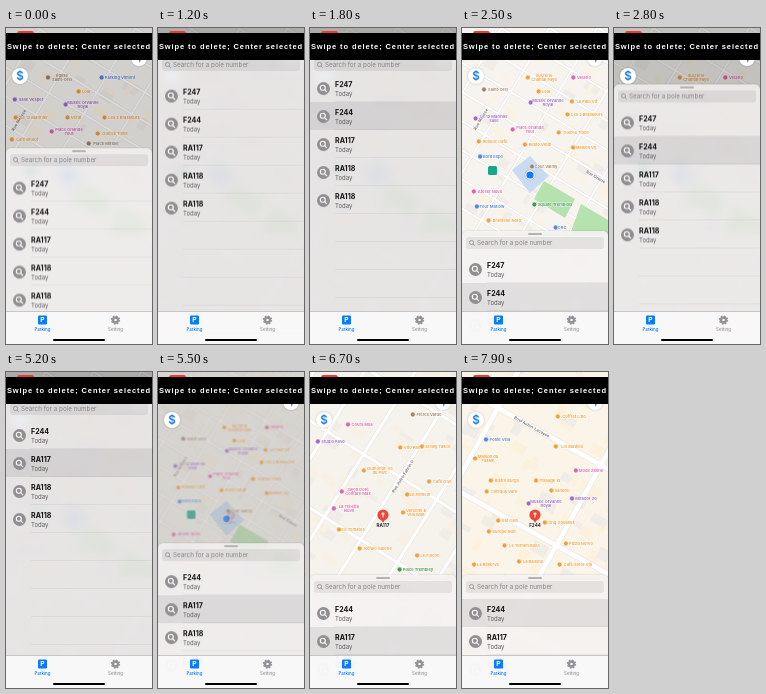
Write an HTML page that moves like this. It is 146 px wide and 316 px high and loops after 8 s.

```html
<!DOCTYPE html>
<html lang="en">
<head>
<meta charset="utf-8">
<title>Parking poles</title>
<style>
html, body { margin: 0; width: 100%; height: 100%; overflow: hidden; background: #f4f0e9; }
body { font-family: Inter, Roboto, sans-serif; }
#stage { position: relative; width: 146px; height: 316px; overflow: hidden; }
#stage div, #stage svg { position: absolute; box-sizing: border-box; }
#map { left: 0; top: 0; }
#map text { font-size: 4.1px; font-weight: 600; text-anchor: middle; stroke: #fff; stroke-width: .8px; stroke-opacity: .8; paint-order: stroke; }
#map .street { fill: #77716b; }
#map .pole { font-size: 4.6px; font-weight: 700; fill: #222; }
#map g { transform-origin: 73px 145px; }

#city, #city .old, #city .new, #north, #centre, #north .labels, #centre .labels,
#dim, #sheet, #list, .mark, .gone, .gone .row { animation: 8s linear infinite; }
#city { animation-name: city; }
#city .old { animation-name: old; }
#city .new { animation-name: new; }
#north { animation-name: north; }
#centre { animation-name: centre; }
#north .labels { animation-name: northLabels; }
#centre .labels { animation-name: centreLabels; }

@keyframes city {
  0%, 15% { opacity: 1; transform: translate(-6px, 1px); }
  23.75%, 67.5% { opacity: 1; transform: none; }
  73.5%, 99.99% { opacity: 0; transform: scale(.7); }
  100% { opacity: 1; transform: translate(-6px, 1px); }
}
@keyframes old { 0%, 16% { opacity: 1; } 23%, 99.99% { opacity: 0; } }
@keyframes new { 0%, 16% { opacity: 0; } 23%, 100% { opacity: 1; } }
@keyframes north {
  0%, 67.5% { opacity: 0; transform: scale(.7); }
  75%, 84.5% { opacity: 1; transform: none; }
  89%, 100% { opacity: 0; transform: scale(.75); }
}
@keyframes centre {
  0%, 84.5% { opacity: 0; transform: scale(.75); }
  90%, 100% { opacity: 1; transform: none; }
}
@keyframes northLabels { 0%, 73% { opacity: 0; } 77.5%, 100% { opacity: 1; } }
@keyframes centreLabels { 0%, 89% { opacity: 0; } 93.75%, 100% { opacity: 1; } }

#dim { inset: 0; background: #000; animation-name: dim; }
@keyframes dim {
  0% { opacity: .15; } 5%, 25% { opacity: .3; }
  30%, 32% { opacity: 0; } 36.25%, 65.5% { opacity: .3; }
  71.25%, 100% { opacity: 0; }
}

.round { width: 16px; height: 16px; border-radius: 50%; background: #fff; box-shadow: 0 0 2px #0004; color: #1583ea; text-align: center; font: 600 11.5px/16px Inter, sans-serif; }

#sheet { left: 0; top: 0; width: 146px; height: 300px; border-radius: 5px 5px 0 0; background: rgba(244, 242, 242, .82); backdrop-filter: blur(5px); box-shadow: 0 0 2px #0003; animation-name: sheet; }
@keyframes sheet {
  0% { transform: translateY(121px); animation-timing-function: cubic-bezier(.2, .7, .4, 1); }
  5%, 25% { transform: translateY(25px); animation-timing-function: ease-in-out; }
  30%, 32% { transform: translateY(203px); animation-timing-function: ease-in-out; }
  36.25%, 65.5% { transform: translateY(25px); animation-timing-function: cubic-bezier(.3, .3, .2, 1); }
  72.5%, 100% { transform: translateY(203px); }
}
.handle { left: 66px; top: 2px; width: 14px; height: 2px; border-radius: 1px; background: #b4b2b2; }
.search { left: 4px; top: 6px; width: 138px; height: 12px; border-radius: 3px; background: #00000012; color: #858389; font-size: 6.3px; line-height: 12px; padding-left: 11px; white-space: nowrap; }
.search svg { left: 2px; top: 2px; width: 8px; height: 8px; stroke: #77757a; }
.clip { left: 0; top: 21px; width: 146px; height: 279px; overflow: hidden; }
#list { left: 0; top: 3px; width: 146px; height: 290px; animation-name: pull; background: repeating-linear-gradient(#0000 0 27.4px, #0000000d 27.4px 28px) 25px 0 no-repeat; }
@keyframes pull {
  0% { transform: translateY(1.5px); }
  5%, 14.5% { transform: none; animation-timing-function: ease-out; }
  18% { transform: translateY(20px); animation-timing-function: ease-in-out; }
  21.25%, 22.5% { transform: translateY(-3px); }
  25%, 100% { transform: none; }
}
.mark { left: 0; top: 0; width: 146px; height: 28px; background: #1c1b2817; animation-name: mark; animation-timing-function: step-end !important; }
@keyframes mark {
  0% { opacity: 0; top: 28px; }
  21.25% { opacity: 1; top: 28px; }
  45% { opacity: 0; top: 28px; }
  65% { opacity: 1; top: 28px; }
  85%, 100% { opacity: 1; top: 0; }
}
#stage .slot { position: relative; width: 146px; height: 28px; overflow: hidden; }
.row { left: 0; top: 0; width: 146px; height: 28px; }
.row svg { left: 6.5px; top: 7.5px; width: 13px; height: 13px; border-radius: 50%; background: #918f92; stroke: #fff; }
.row b, .row span { position: absolute; left: 25px; line-height: 8px; white-space: nowrap; }
.row b { top: 7px; font-size: 7.1px; font-weight: 700; color: #111; }
.row span { top: 16px; font-size: 6px; color: #5d5b5e; }
.delete { left: 146px; width: 146px; height: 28px; background: #ff3b30; color: #fff; font-size: 6.6px; line-height: 28px; padding-left: 6px; }
.gone { animation-name: collapse; }
.gone .row { animation-name: swipe; }
@keyframes swipe {
  0%, 43.8% { transform: none; }
  45% { transform: translateX(-18px); }
  47.5% { transform: translateX(-44px); }
  50% { transform: translateX(-50px); }
  51.8%, 100% { transform: translateX(-146px); }
}
@keyframes collapse {
  0%, 51.2% { height: 28px; animation-timing-function: ease-in-out; }
  55%, 100% { height: 0; }
}

.tabs { left: 0; top: 283px; width: 146px; height: 33px; background: rgba(249, 248, 248, .97); border-top: .5px solid #c9c7c6; font-size: 4.4px; font-weight: 500; }
.tabs svg { left: 0; top: 0; }
.home { left: 47px; top: 310.5px; width: 52px; height: 2px; border-radius: 1px; background: #000; }
.pill { left: 11px; top: 3px; width: 17px; height: 5px; border-radius: 3px; background: #ee3a32; }
.banner { left: 0; top: 5px; width: 146px; height: 27px; background: #000; color: #fff; font: bold 7.5px/27px "Liberation Sans", Arial, sans-serif; letter-spacing: .91px; white-space: nowrap; padding-left: .9px; }
</style>
</head>
<body>
<div id="stage">
  <svg id="map" width="146" height="316"></svg>
  <div id="dim"></div>
  <div class="round" style="left:6px;top:40px">$</div>
  <div class="round" style="left:125px;top:22px">
    <svg width="16" height="16" style="left:0;top:0"><path d="M4 9 12 5 8.5 13 8 9Z" fill="#1583ea"/></svg>
  </div>
  <div id="sheet">
    <div class="handle"></div>
    <div class="search"><svg viewBox="0 0 13 13" fill="none"><path d="M8 8 11 11M9 5.7a3.3 3.3 0 1 1-6.6 0a3.3 3.3 0 1 1 6.6 0"/></svg>Search for a pole number</div>
    <div class="clip"><div id="list"><div class="mark"></div></div></div>
  </div>
  <div class="tabs">
    <svg width="146" height="26">
      <rect x="32" y="3.5" width="9" height="9" rx="1.2" fill="#0a7aff"/>
      <text x="36.5" y="10.4" font-size="6.8" font-weight="700" fill="#fff" text-anchor="middle">P</text>
      <text x="36.5" y="19" fill="#0a7aff" text-anchor="middle">Parking</text>
      <g fill="none" stroke="#929196">
        <circle cx="109.5" cy="8" r="2.5" stroke-width="2.4"/>
        <circle cx="109.5" cy="8" r="4" stroke-width="1.3" stroke-dasharray="1.6 1.54"/>
      </g>
      <text x="109.5" y="19" fill="#929196" text-anchor="middle">Setting</text>
    </svg>
  </div>
  <div class="home"></div>
  <div class="pill"></div>
  <div class="banner">Swipe to delete; Center selected</div>
</div>
<script>
const glass = '<svg viewBox="0 0 13 13" fill="none" stroke-width="1.1"><path d="M7.4 7.4 10 10M8.3 5.7a2.5 2.5 0 1 1-5 0a2.5 2.5 0 1 1 5 0"/></svg>';
const list = document.getElementById('list');
['F247', 'F244', 'RA117', 'RA118', 'RA118'].forEach((name, i) => {
  list.insertAdjacentHTML('beforeend',
    `<div class="slot${i ? '' : ' gone'}"><div class="row">${glass}<b>${name}</b><span>Today</span>` +
    (i ? '' : '<div class="delete">Delete</div>') + '</div></div>');
});

const hues = { o: '#f0a03c', p: '#dc66ad', v: '#a06bc4', b: '#5288d8', n: '#a08468', g: '#3d9c4c' };

function random(seed) {
  return () => (seed = seed * 16807 % 2147483647) / 2147483647;
}

// Buildings and streets on a tilted grid with a crossing at (cx, cy)
function streets(angle, cx, cy, gapX, gapY, width, land, tint) {
  const rnd = random(gapX * 97);
  let blocks = '', roads = '';
  for (let i = 0; i < 320; i++) {
    const w = 4 + rnd() * 12, h = 4 + rnd() * 9;
    blocks += `<rect x="${rnd() * 400 - 200}" y="${rnd() * 400 - 200}" width="${w}" height="${h}" fill="${rnd() < .6 ? tint : '#f0ece8'}"/>`;
  }
  for (let i = -9; i < 10; i++) roads += `M${i * gapX} -300V300M-300 ${i * gapY}H300`;
  return `<rect x="-150" y="-100" width="450" height="520" fill="${land}"/>
    <g style="transform-origin:0 0" transform="translate(${cx} ${cy}) rotate(${angle})">${blocks}
    <path d="${roads}" stroke="#e2dedb" stroke-width="${width + .8}"/><path d="${roads}" stroke="#fff" stroke-width="${width}"/></g>`;
}

function label([x, y, hue, name]) {
  const lines = name.split('/');
  const half = Math.max(...lines.map(s => s.length)) * 1.1;
  return `<circle cx="${x - half - 3}" cy="${y + lines.length * 2 - 2.5}" r="2.4" fill="${hues[hue]}" stroke="#fff" stroke-width=".5"/>` +
    lines.map((s, i) => `<text x="${x}" y="${y + 1 + i * 4.2}" fill="${hues[hue]}">${s}</text>`).join('');
}

const labels = (cls, items) => `<g class="${cls}">${items.map(label).join('')}</g>`;

const street = (x, y, angle, name) =>
  `<text class="street" transform="translate(${x} ${y}) rotate(${angle})">${name}</text>`;

const pin = (x, y, name) =>
  `<path d="M${x - 2.2} ${y + 4}L${x} ${y + 8}L${x + 2.2} ${y + 4}Z" fill="#e9493d"/>
   <circle cx="${x}" cy="${y}" r="5.6" fill="#e9493d"/>
   <path d="M${x} ${y - 2.6}V${y + 2.4}M${x - 1.6} ${y - 1.2}H${x + 1.6}" stroke="#fff" stroke-width="1"/>
   <text class="pole" x="${x}" y="${y + 12}">${name}</text>`;

const city = streets(31, 58, 128, 41, 25, 2, '#f7f4f0', '#faf2e3') +
  `<path d="M50 142 68 128 87 148 68 165Z" fill="#b9d3f0" opacity=".75"/>
   <path d="M82 153 113 171 103 190 72 171ZM119 176 146 192V206H108Z" fill="#b5e2ae"/>
   <rect x="26" y="138" width="9" height="9" rx="1.5" fill="#1aa58a"/>` +
  street(20, 92, -59, 'Rue Mélisse') + street(133, 150, 31, 'Rue Oriane') +
  labels('old', [
    [62, 47, 'n', 'Église/Saint-Orel'], [120, 49, 'b', 'Parking Vimont'], [86, 63, 'o', 'Lola'],
    [83, 74, 'v', 'Musée Orvanne/Royal'], [34, 89, 'o', 'Le 12 Marinier'],
    [69, 101, 'p', 'Place Orlande/Tour'], [115, 105, 'o', 'Glaces Tivoli'],
    [124, 89, 'o', 'Les 2 Brasseurs'], [27, 111, 'o', 'Café Brulot'], [31, 71, 'v', 'Salle Vesper'],
    [106, 115, 'n', 'Place Mirelle'], [76, 89, 'o', 'Verdi']
  ]) +
  labels('new', [
    [82, 48, 'o', 'Sucrerie/Chantal Faye'], [122, 50, 'p', 'Velario'], [84, 64, 'o', 'Lola'],
    [86, 73, 'v', 'Musée Orvanne/Royal'], [125, 74, 'o', 'Le Pain Vif'],
    [125, 87, 'o', 'Les 2 Brasseurs'], [32, 89, 'v', 'Le 12 Marinier/Salle'],
    [68, 100, 'p', 'Place Orlande/Tour'], [114, 105, 'o', 'Glaces Tivoli'], [33, 114, 'o', 'Roselle Café'],
    [31, 129, 'b', 'Bord Expo'], [124, 120, 'o', 'Maison Vy'], [84, 139, 'n', 'Cour Valmy'],
    [28, 164, 'p', 'Atelier Nuvo'], [30, 179, 'b', 'Tour Marlow'], [45, 193, 'o', 'Brantelle Nord'],
    [93, 177, 'g', 'Square Tremblois'], [100, 200, 'b', 'ORC'], [36, 62, 'n', 'Saint-Orel'],
    [78, 117, 'o', 'Resto Verdi']
  ]) +
  '<circle cx="68" cy="147" r="5" fill="#fff" stroke="#0002"/><circle cx="68" cy="147" r="3.6" fill="#0a7aff"/>';

const north = streets(32, 90, 105, 43, 74, 3.2, '#f6f2ec', '#f7f0e3') +
  street(94, 105, -58, 'Rue Jules-Fabrin O') +
  labels('labels', [
    [119, 43, 'n', 'Frères Vardo'], [23, 70, 'v', 'Studio Pavo'], [70, 97, 'o', 'Dumontin Vil/du Parc'],
    [128, 75, 'o', 'El Rey Tasco'], [102, 76, 'o', 'Vito Pan'], [48, 118, 'p', 'Salon Doré/Coiffure Max'],
    [106, 139, 'o', 'Varenne &/Vila Wok'], [110, 123, 'o', 'Le Pomelo'], [39, 135, 'p', 'La Toilette/Nuvo'],
    [43, 158, 'o', '20 Tomates'], [68, 177, 'o', 'Kéfalo Galerie'], [120, 184, 'o', 'Le Flocon'],
    [108, 198, 'g', 'Place Trembley'], [132, 110, 'o', 'Café Olvi'], [52, 53, 'p', 'Cours Mila']
  ]) + pin(73, 143, 'RA117');

const centre = streets(29, 139, 93, 118, 92, 5, '#fbf4e8', '#fcf1dc') +
  street(69, 56, 29, 'Boul Aubin-Lacasse') +
  labels('labels', [
    [38, 68, 'b', 'Poste Véla'], [26, 85, 'o', 'Maison du/Fusain'], [45, 109, 'o', 'Bistro Burgo'],
    [42, 120, 'o', 'Clinique Vars'], [88, 109, 'o', 'Tissage 12'], [48, 149, 'o', 'Est Galo'],
    [42, 160, 'o', 'Europe Nuit'], [84, 130, 'v', 'Musée Orvanne/Royal'], [100, 119, 'o', 'Sandrel'],
    [124, 127, 'v', 'Mirador Zo'], [99, 151, 'o', 'Cinq Gousses'], [110, 75, 'o', 'Lin Bentelli'],
    [116, 193, 'o', 'Café Sorel-Vin'], [71, 190, 'o', 'La Baleine'], [119, 172, 'o', 'Pizza Norvo'],
    [62, 174, 'o', 'Le Terrain Bleu'], [26, 193, 'o', 'La Réserve'], [129, 99, 'p', 'Mode Zéline'],
    [112, 45, 'o', 'Coffret Lino']
  ]) + pin(73, 143, 'F244');

document.getElementById('map').innerHTML =
  `<g id="city">${city}</g><g id="north">${north}</g><g id="centre">${centre}</g>`;
</script>
</body>
</html>
```
